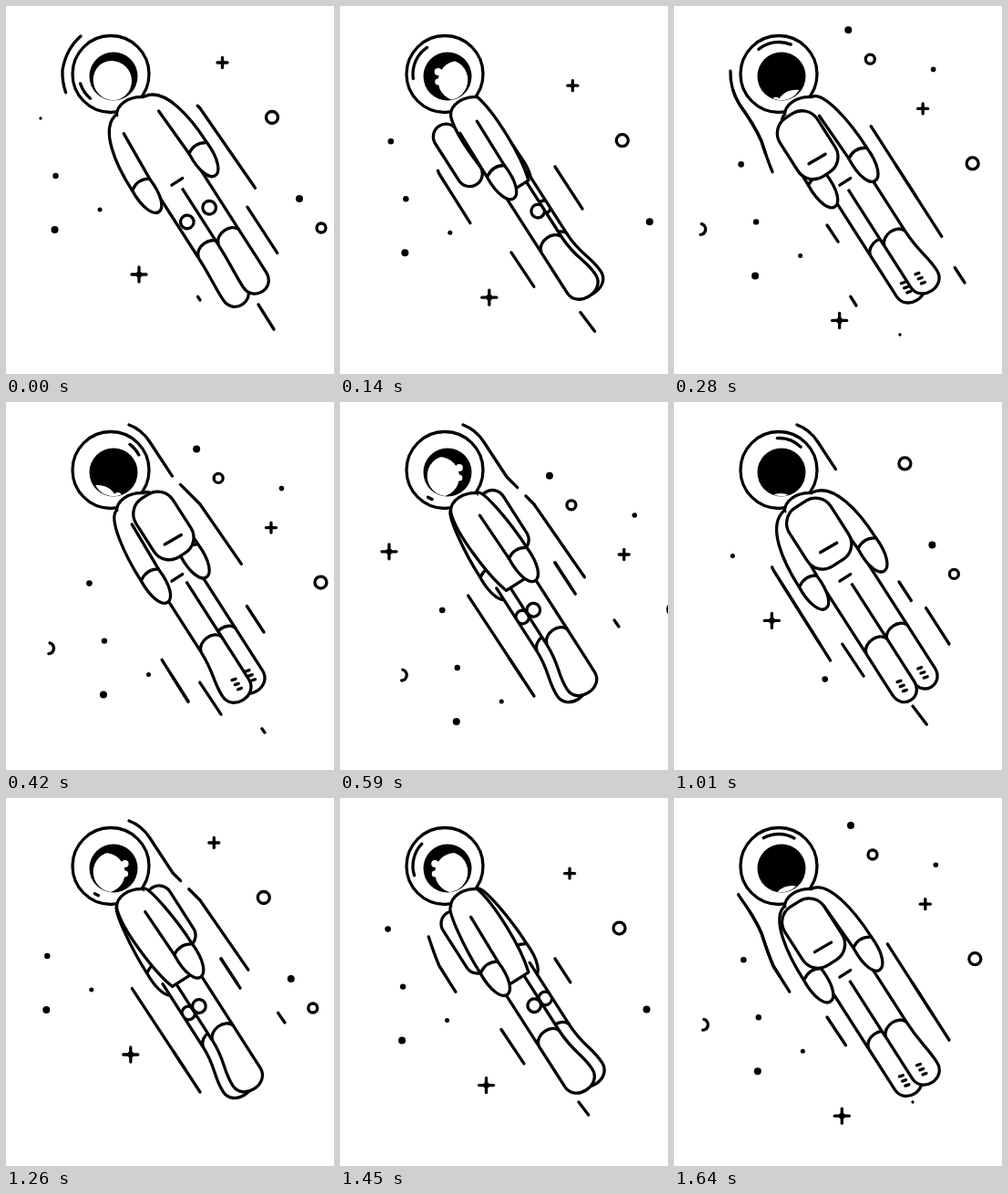
An HTML page with a canvas for the animation above (1670 ms loop, 360 by 403 pixels).

```html
<!DOCTYPE html>
<html lang="en">
<head>
<meta charset="utf-8">
<title>Drifting astronaut</title>
<style>
html, body { margin: 0; width: 100%; height: 100%; overflow: hidden; background: #fff; }
canvas { display: block; width: 360px; height: 403px; }
</style>
</head>
<body>
<canvas id="stage"></canvas>
<script>
const canvas = document.getElementById('stage');
const ratio = window.devicePixelRatio || 1;
canvas.width = 360 * ratio;
canvas.height = 403 * ratio;
const ctx = canvas.getContext('2d');

const LOOP = 1670;          // ms
const SPIN = 28;            // steps per turn
const DRIFT = 2 * SPIN;     // steps until the star field repeats
const VX = 2.97, VY = 4.2;  // star drift per step
const LINE = 3.3;

const star = (draw, x, y, size, born, life = 54) => ({ draw, x, y, size, born, life });
const streak = (d, born, length) => ({ path: new Path2D(d), born, length });
const rad = deg => deg * Math.PI / 180;

// Places are those at step 0.
const stars = [
  star(spark, 237.5, 62, 5.5, -12),
  star(ring, 292, 122, 6.5, -25),
  star(dot, 322, 211, 4, -46),
  star(ring, 346, 243, 5, -50),
  star(dot, 54.5, 186, 3.2, -12),
  star(dot, 53.5, 245, 4, -8, 35),
  star(dot, 103, 223, 2.5, -24),
  star(spark, 146, 294, 8, -37),
  star(dot, 38, 123, 3.3, -1),
  star(dot, 249, 19, 2.8, 8, 25),
  star(moon, -7, 194, 6, 9, 20)
];

const leftLane = 'M82 33Q66 47 62 70Q61 90 72 108Q88 130 96 148Q103 170 109 184L200 328';
const rightLane = 'M135 25Q149 30 158 44L183 82L213 112L306 246';
const hipLane = 'M236 176L319 303';
const legLane = 'M168 240L248 360';
const footLane = 'M262 333L284 362';
const streaks = [
  streak(leftLane, 8.4, 100),
  streak(leftLane, 25.5, 68),
  streak(rightLane, 22.9, 110),
  streak(rightLane, 16.3, 110),
  streak('M179 74L302 265', 6.3, 93),
  streak(hipLane, 23.3, 60),
  streak(hipLane, 3.5, 55),
  streak('M247 197L283 252', 13.3, 36),
  streak(legLane, 10.7, 42),
  streak(legLane, 1.5, 45),
  streak('M136 205L213 322', 22.3, 106),
  streak('M277 327L294 354', 25.5, 32),
  streak(footLane, 12.9, 30),
  streak(footLane, 3.2, 26)
];

function dot(x, y, r, fill = '#000') {
  ctx.beginPath();
  ctx.arc(x, y, r, 0, 2 * Math.PI);
  ctx.fillStyle = fill;
  ctx.fill();
}

function arc(x, y, r, from, to) {
  ctx.beginPath();
  ctx.arc(x, y, r, from, to);
  ctx.stroke();
}

function ring(x, y, r) { arc(x, y, r, 0, 2 * Math.PI); }
function moon(x, y, r) { arc(x, y, r, -1.3, 1.5); }

function line(x1, y1, x2, y2) {
  ctx.beginPath();
  ctx.moveTo(x1, y1);
  ctx.lineTo(x2, y2);
  ctx.stroke();
}

function spark(x, y, r) {
  line(x - r, y, x + r, y);
  line(x, y - r, x, y + r);
  dot(x, y, r * 0.42);
}

function fillAndStroke() {
  ctx.fillStyle = '#fff';
  ctx.fill();
  ctx.stroke();
}

function drawStars(u) {
  const now = u % DRIFT;
  for (const s of stars) {
    for (const w of [now - DRIFT, now, now + DRIFT]) {
      const age = w - s.born;
      if (age <= 0 || age >= s.life) continue;
      const grow = Math.min(1, age / 2, (s.life - age) / 2);
      s.draw(s.x + VX * w, s.y + VY * w, s.size * grow);
    }
  }
}

// Every streak takes 2.5 steps to pass a point, so long ones fly faster.
function drawStreaks(u) {
  for (const { path, born, length } of streaks) {
    for (const w of [u % SPIN, u % SPIN + SPIN]) {
      const head = length * (w - born) / 2.5;
      const tail = Math.max(0, head - length);
      if (head <= 0) continue;
      ctx.setLineDash([head - tail, 999]);
      ctx.lineDashOffset = -tail;
      ctx.stroke(path);
    }
  }
  ctx.setLineDash([]);
}

function drawHead(sin, cos, u) {
  dot(115, 74.5, 42, '#fff');
  ring(115, 74.5, 42);
  dot(118, 77, 26.5);
  ctx.save();
  ctx.beginPath();
  ctx.arc(118, 81, 22.3, 0, 2 * Math.PI);
  ctx.clip();
  const faceX = 117.5 + 18 * sin * (1 - 0.6 * cos);
  const faceY = 82 + 40 * Math.max(0, -cos);
  dot(faceX, faceY, 22, '#fff');
  if (Math.abs(sin) > 0.6) {
    const edge = faceX - Math.sign(sin) * 22;
    dot(edge, faceY - 10, 4, '#fff');
    dot(edge, faceY + 1, 3.5, '#fff');
  }
  ctx.restore();
  const glide = (u + 4) % SPIN;
  const half = rad(34) * Math.sin(Math.PI * glide / 25);
  const angle = rad(108 + 9.6 * glide);
  if (half > 0) arc(115, 74.5, 35, angle - half, angle + half);
}

function drawPack(sin, cos) {
  const x = -44 * sin * Math.abs(sin) ** 1.2;
  const half = 14 + 13 * Math.max(0, -cos);
  ctx.beginPath();
  ctx.roundRect(x - half, 5, 2 * half, 76, Math.min(half, 20));
  fillAndStroke();
  if (cos < -0.5) line(x - 10, 61, x + 11, 62);
}

function drawLeg(side, sin, cos, spread) {
  const c = side * 13.5 * spread + 1.5 * sin, l = c - 14, r = c + 14;
  ctx.fillStyle = '#fff';
  ctx.fillRect(l, 99, 28, 85);
  if (cos > -0.3) {
    ctx.save();
    ctx.beginPath();
    ctx.rect(l, 99, 28, 85);
    ctx.clip();
    ring(side * 15 * spread + 10 * sin, 142, 7.3);
    ctx.restore();
  }
  line(l, 100, l, 180);
  line(r, 100, r, 180);
  const toeL = l + Math.min(0, 10 * sin), toeR = r + Math.max(0, 10 * sin);
  ctx.beginPath();
  ctx.moveTo(l, 182);
  ctx.bezierCurveTo(l + 3, 169, r - 3, 169, r, 180);
  ctx.bezierCurveTo(r, 208, toeR, 215, toeR, 235);
  ctx.bezierCurveTo(toeR, 256, toeL, 256, toeL, 235);
  ctx.bezierCurveTo(toeL, 215, l, 208, l, 182);
  fillAndStroke();
  if (cos < -0.7) for (const y of [226, 232, 238]) line(c - 2, y, c + 2, y + 1);
}

function drawTorso(profile) {
  const collar = () => {
    ctx.beginPath();
    ctx.moveTo(-19, 3);
    ctx.bezierCurveTo(-13, -9, 5, -8, 17, 1);
  };
  collar();
  ctx.bezierCurveTo(24, 25, 23, 80, 15, 108);
  ctx.lineTo(-14, 108);
  ctx.bezierCurveTo(-22, 85, -27, 25, -19, 3);
  ctx.fillStyle = '#fff';
  ctx.fill();
  if (profile) return ctx.stroke();
  collar();
  ctx.stroke();
  line(-9, 99, 5, 99);
}

function drawArm(side, spread) {
  const reach = side * spread;
  const c = 38 * reach;
  const out = reach < 0 ? -1 : 1;
  const inner = c - out * 11, outer = c + out * 11;
  ctx.beginPath();
  ctx.moveTo(inner - out * 3 * Math.abs(reach), 23);
  ctx.lineTo(inner, 80);
  ctx.bezierCurveTo(inner - out * 4, 128, outer + out * 4, 128, outer + out, 80);
  if (Math.abs(reach) > 0.3) ctx.bezierCurveTo(outer + out, 48, c + out * 6, 4, out * 18, 1);
  else ctx.lineTo(outer, 24);
  fillAndStroke();
  ctx.beginPath();
  ctx.moveTo(inner, 80);
  ctx.quadraticCurveTo(c, 73, outer, 80);
  ctx.stroke();
}

// The body is drawn upright, then tilted; limbs spread with the turn.
function drawAstronaut(u) {
  const turn = rad(360 * u / SPIN - 12);
  const sin = Math.sin(turn), cos = Math.cos(turn);
  const spread = cos * Math.abs(cos) ** 0.6;
  const near = sin > 0 ? -1 : 1;
  const profile = Math.abs(cos) < 0.75;
  drawHead(sin, cos, u);
  ctx.save();
  ctx.translate(136, 108);
  ctx.rotate(rad(-32.7));
  if (cos > -0.3) drawPack(sin, cos);
  if (profile) drawArm(-near, spread);
  drawLeg(-near, sin, cos, spread);
  drawLeg(near, sin, cos, spread);
  drawTorso(profile);
  if (!profile) drawArm(-near, spread);
  drawArm(near, spread);
  if (cos <= -0.3) drawPack(sin, cos);
  ctx.restore();
}

// Pictures last 30, 20 and 20 ms in turn; the motion rests briefly after two thirds.
function stepAt(ms) {
  const rest = ms % 70;
  const step = 3 * Math.floor(ms / 70) + (rest >= 30) + (rest >= 50);
  return step < 48 ? step : step - 1.1;
}

function draw(ms) {
  const u = stepAt(ms);
  ctx.setTransform(ratio, 0, 0, ratio, 0, 0);
  ctx.fillStyle = '#fff';
  ctx.fillRect(0, 0, 360, 403);
  ctx.strokeStyle = '#000';
  ctx.lineWidth = LINE;
  ctx.lineCap = ctx.lineJoin = 'round';
  drawStars(u);
  drawStreaks(u);
  drawAstronaut(u);
}

const start = performance.now();
function tick() {
  draw((performance.now() - start) % LOOP);
  requestAnimationFrame(tick);
}
tick();
</script>
</body>
</html>
```
